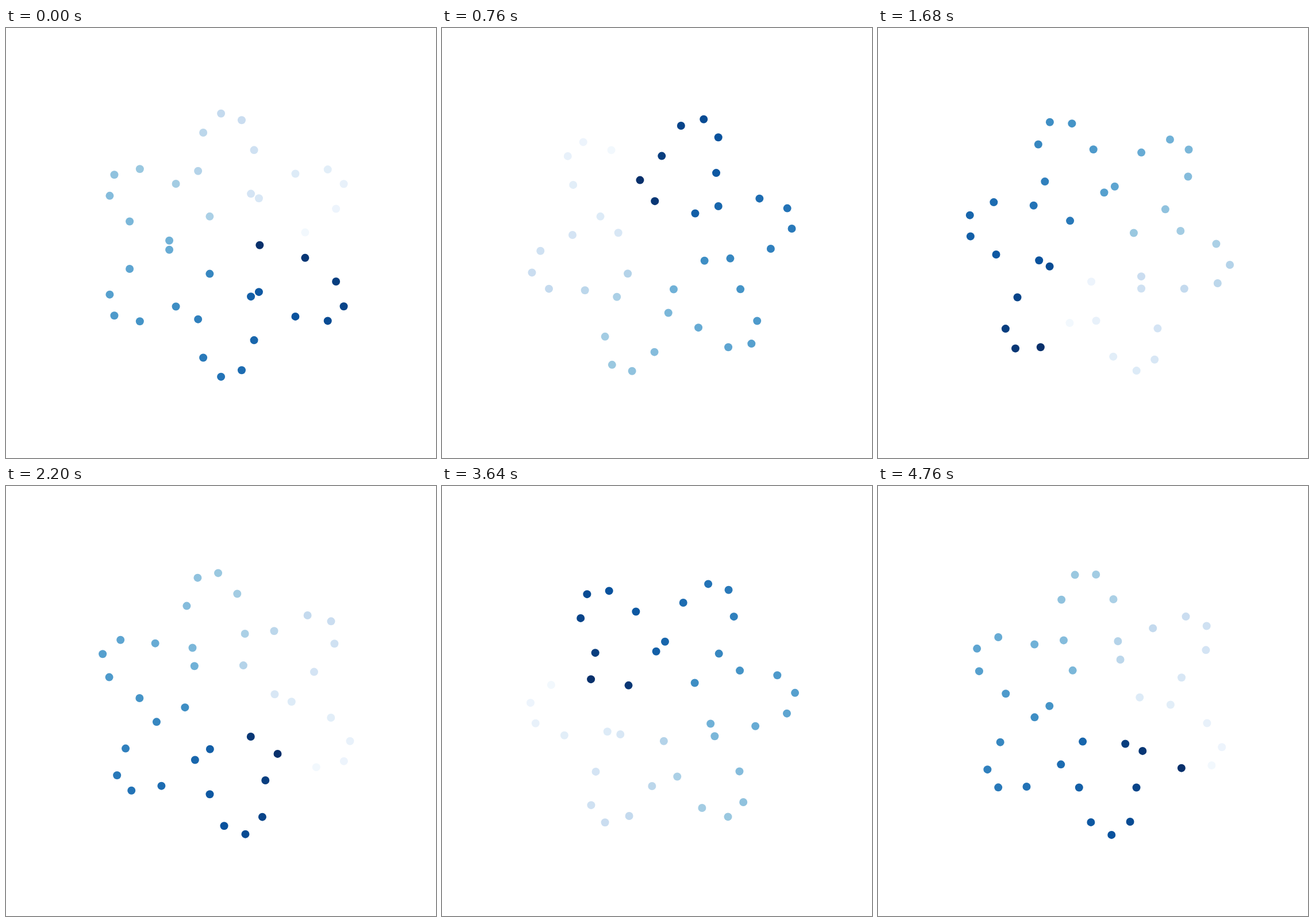
An HTML page with a canvas that plays this animation: 748 by 748 pixels, repeating every 4.8 s.

```html
<!DOCTYPE html>
<html lang="en">
<head>
<meta charset="utf-8">
<title>Six-petal dots</title>
<style>
  html, body { margin: 0; width: 100%; height: 100%; overflow: hidden; background: #fff; }
  canvas { display: block; width: 748px; height: 748px; }
</style>
</head>
<body>
<canvas id="stage" width="748" height="748"></canvas>
<script>
const ctx = document.getElementById('stage').getContext('2d');
const SIZE = 748;
const STEP_MS = 40, STEPS = 120;
const DOTS = 40, DOT_RADIUS = 7;
const CENTER = { x: 383.35, y: 377.74 };
const UNIT = { x: 231.88, y: 230.38 };

// Light-to-dark blue ramp, interpolated linearly
const RAMP = ['f7fbff', 'deebf7', 'c6dbef', '9ecae1', '6baed6', '4292c6', '2171b5', '08519c', '08306b']
  .map(hex => [0, 2, 4].map(k => parseInt(hex.slice(k, k + 2), 16)));

function rampColor(u) {
  const pos = u * (RAMP.length - 1);
  const i = Math.min(Math.floor(pos), RAMP.length - 2);
  const mix = RAMP[i].map((c, k) => Math.round(c + (RAMP[i + 1][k] - c) * (pos - i)));
  return `rgb(${mix})`;
}

const dots = Array.from({ length: DOTS }, (_, j) => {
  const u = j / (DOTS - 1);
  return { theta: u * 2 * Math.PI, color: rampColor(u) };
});

function draw(t) {
  ctx.fillStyle = '#fff';
  ctx.fillRect(0, 0, SIZE, SIZE);
  for (const { theta, color } of dots) {
    const r = 0.25 + 0.75 * Math.abs(Math.sin(3 * theta + 3.5 * t));
    const x = CENTER.x + UNIT.x * r * Math.cos(theta + t);
    const y = CENTER.y - UNIT.y * r * Math.sin(theta + t);
    ctx.fillStyle = color;
    ctx.beginPath();
    ctx.arc(x, y, DOT_RADIUS, 0, 2 * Math.PI);
    ctx.fill();
  }
}

let start = null;
function tick(now) {
  if (start === null) start = now;
  const step = Math.floor(Math.max(0, now - start) / STEP_MS) % STEPS;
  draw(step * 0.1);
  requestAnimationFrame(tick);
}
draw(0);
requestAnimationFrame(tick);
</script>
</body>
</html>
```
